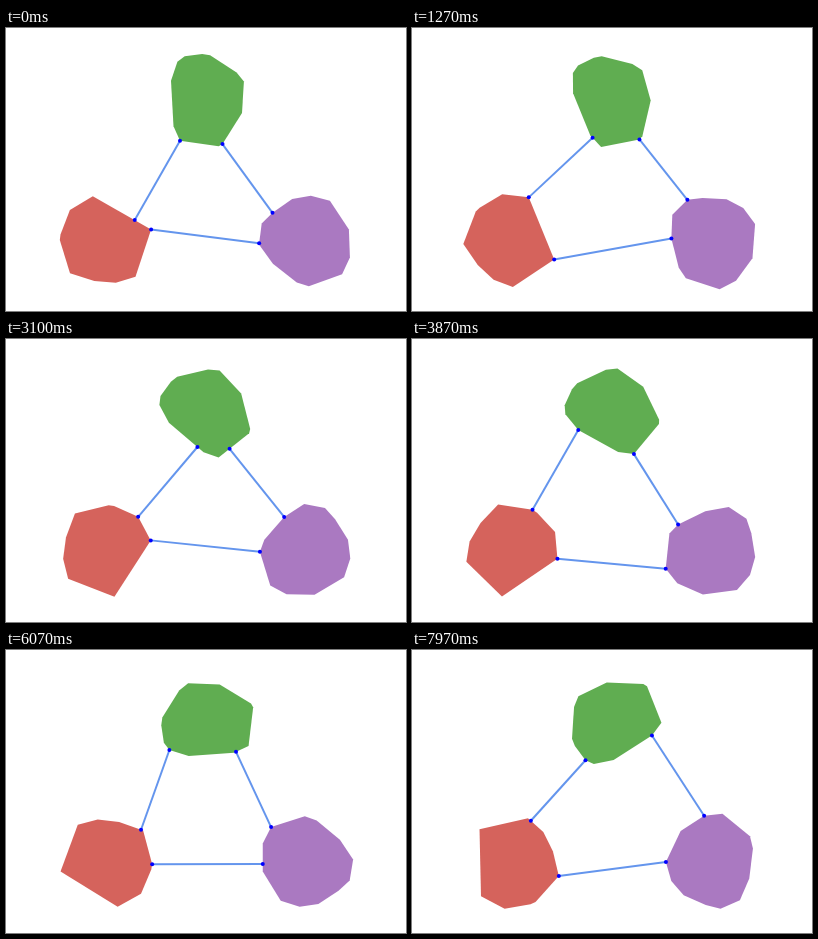
An HTML page for the animation above (8000 ms loop, 400 by 283 pixels).

```html
<!DOCTYPE html>
<html lang="en">
<head>
<meta charset="utf-8">
<title>Closest points of rotating polygons</title>
<style>
  html, body { margin: 0; width: 100%; height: 100%; overflow: hidden; background: #fff; }
  svg { display: block; width: 100%; height: 100%; }
</style>
</head>
<body>
<svg id="stage" viewBox="0 0 400 283"></svg>
<script>
const LOOP = 8000;
const FPS = 30;

// Vertices are relative to the centre; spin is degrees per step.
const shapes = [
  { x: 200, y: 70.75, spin: -0.5, fill: '#60ad51', pts: [
    [-35, -17.9], [-28.6, -37.1], [-21.3, -42.5], [-3.8, -44.8], [4.1, -43.6], [30.6, -26.3],
    [37.9, -17.2], [36, 14.3], [16.5, 45.3], [12.7, 47.4], [-26, 42.1], [-32.5, 27.5]] },
  { x: 100, y: 212.25, spin: 1, fill: '#d5635c', pts: [
    [-36, 33], [-46.2, -0.3], [-45.5, -5.7], [-36.1, -30.3], [-13.2, -44.1],
    [45.1, -10.8], [29.5, 36.4], [9.8, 42.4], [-11.7, 40.7]] },
  { x: 300, y: 212.25, spin: 1, fill: '#aa79c1', pts: [
    [-47, 4.3], [-44.3, -16.7], [-33.5, -27.4], [-13.8, -41.3], [4.8, -44.6], [23.9, -39.4],
    [42.9, -10.8], [43.9, 17.2], [36.1, 33.9], [2.8, 46], [-9.2, 42.2], [-33.1, 23.6]] },
];

const stage = document.getElementById('stage');

function add(tag, attrs) {
  const el = document.createElementNS(stage.namespaceURI, tag);
  set(el, attrs);
  return stage.appendChild(el);
}

function set(el, attrs) {
  for (const key in attrs) el.setAttribute(key, attrs[key]);
}

for (const s of shapes) s.el = add('polygon', { fill: s.fill });

const links = [[0, 1], [1, 2], [2, 0]].map(pair => ({
  pair,
  line: add('line', { stroke: '#6495ed', 'stroke-width': 2 }),
  dots: pair.map(() => add('circle', { r: 2, fill: '#00f' })),
}));

function rotated(s, step) {
  const a = s.spin * step * Math.PI / 180;
  const c = Math.cos(a), n = Math.sin(a);
  return s.pts.map(([x, y]) => [s.x + x * c - y * n, s.y + x * n + y * c]);
}

function nearestOnEdge(p, a, b) {
  const dx = b[0] - a[0], dy = b[1] - a[1];
  const k = ((p[0] - a[0]) * dx + (p[1] - a[1]) * dy) / (dx * dx + dy * dy);
  const u = Math.max(0, Math.min(1, k));
  return [a[0] + u * dx, a[1] + u * dy];
}

// Shortest segment from a vertex of one polygon to an edge of the other.
function vertexToEdge(from, to) {
  let best = { d: Infinity };
  for (const p of from) {
    to.forEach((a, i) => {
      const q = nearestOnEdge(p, a, to[(i + 1) % to.length]);
      const d = Math.hypot(p[0] - q[0], p[1] - q[1]);
      if (d < best.d) best = { d, p, q };
    });
  }
  return best;
}

function closest(a, b) {
  const ab = vertexToEdge(a, b), ba = vertexToEdge(b, a);
  return ab.d <= ba.d ? [ab.p, ab.q] : [ba.q, ba.p];
}

function draw(ms) {
  // Steps fall on whole hundredths of a second.
  const tick = Math.floor(ms / 10) * 10;
  const step = Math.floor((tick + 4) * FPS / 1000);
  const polys = shapes.map(s => rotated(s, step));
  shapes.forEach((s, i) => set(s.el, { points: polys[i].map(p => p.join()).join(' ') }));
  for (const { pair: [i, j], line, dots } of links) {
    const ends = closest(polys[i], polys[j]);
    const [p, q] = ends;
    set(line, { x1: p[0], y1: p[1], x2: q[0], y2: q[1] });
    dots.forEach((dot, k) => set(dot, { cx: ends[k][0], cy: ends[k][1] }));
  }
}

let start;
function frame(now) {
  start ??= now;
  draw((now - start) % LOOP);
  requestAnimationFrame(frame);
}
draw(0);
requestAnimationFrame(frame);
</script>
</body>
</html>
```
